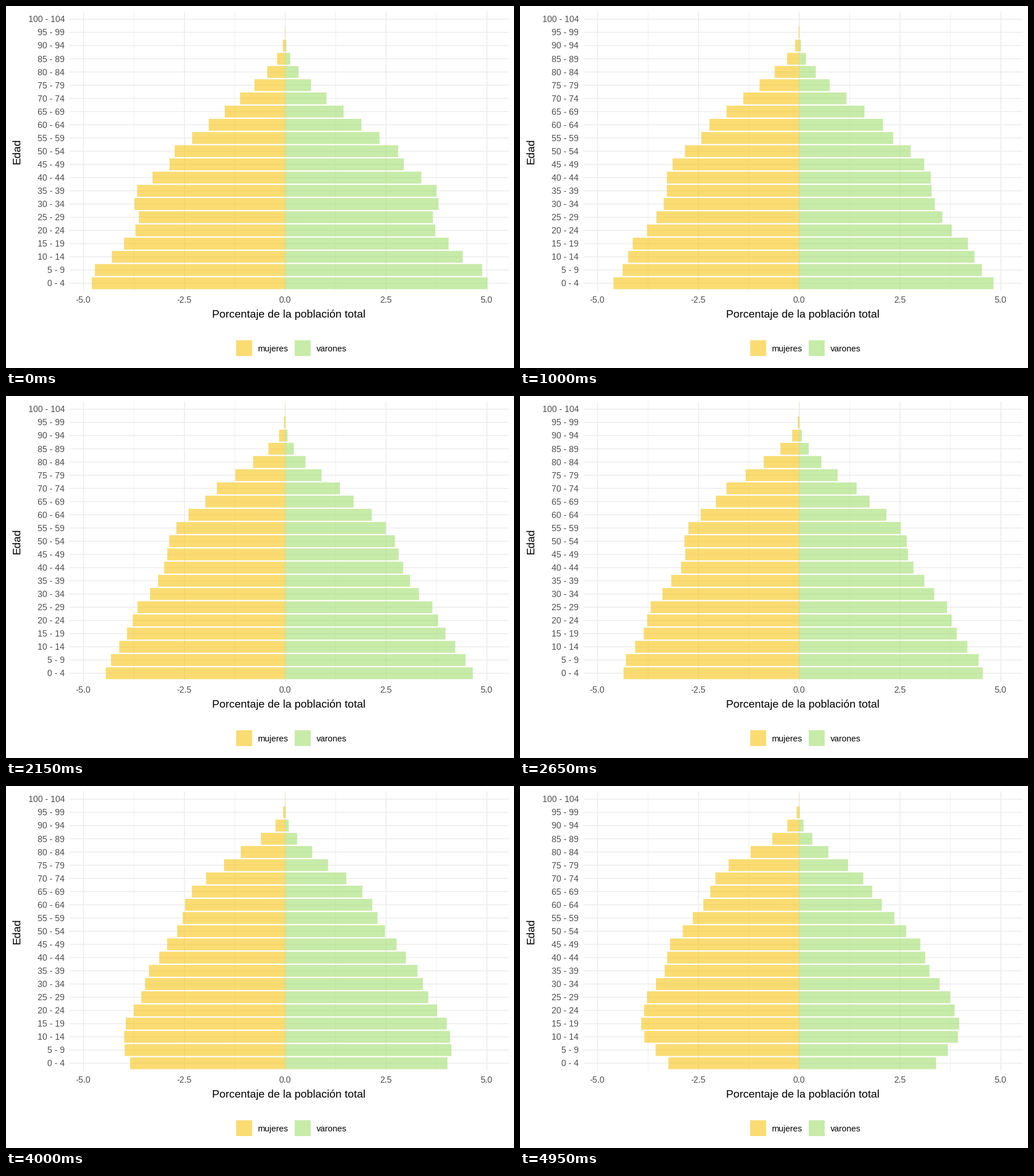
Recreate the animation shown at these times as a matplotlib script. Size 885x632 px, loop 5 s.

```python
import numpy as np
import matplotlib.pyplot as plt
from matplotlib.animation import FuncAnimation
from matplotlib.patches import Rectangle

W, H, DPI = 885, 632, 100
FRAMES, INTERVAL = 100, 50

# Panel geometry in pixels, y pointing down
LEFT, RIGHT, TOP, BOTTOM = 110.4, 875.8, 9.2, 497.8
ZERO, UNIT = 486.5, 70.24
FIRST_ROW, STEP = 484.0, 23.05
BAR = 0.9 * STEP

YELLOW, GREEN = "#F7C514", "#A2DE6E"
ALPHA = 0.6
GRID, GREY = "#EBEBEB", "#4D4D4D"

AGES = np.arange(21)  # five-year age groups
CENSUSES = 5          # ten years, or two age groups, apart

# Relative size at birth of a cohort, by its age group at the first census
COHORTS = [(-8, 221), (-6, 288), (-5, 308), (-3, 327), (-1, 319),
           (1, 340), (2, 325), (4, 309), (5, 317), (6, 343), (7, 354),
           (8, 334), (9, 307), (10, 311), (20, 0)]


def pyramid(census):
    """Women and men per age group, in percent of the whole population."""
    births = np.interp(AGES - 2 * census, *zip(*COHORTS))
    women = births * np.exp(-0.0477 * AGES - np.exp(0.54 * (AGES - 16.83)))
    # Fewer men survive with age; the early censuses hold more older men
    early = 0.019 * np.maximum(AGES - 4, 0) / 2 ** census
    men = women * np.exp(0.045 - 0.01 * AGES
                         - np.exp(0.4 * (AGES - 18.2)) + early)
    people = np.array([women, men])
    return 100 * people / people.sum()


plt.rcParams["font.family"] = "Liberation Sans"
plt.rcParams["text.hinting"] = "native"
fig = plt.figure(figsize=(W / DPI, H / DPI), dpi=DPI, facecolor="white")
ax = fig.add_axes([0, 0, 1, 1])
ax.set_xlim(0, W)
ax.set_ylim(H, 0)
ax.axis("off")


def line(xs, ys, px):
    ax.plot(xs, ys, color=GRID, lw=px * 72 / DPI, solid_capstyle="butt",
            snap=False, zorder=1)


def text(x, y, s, px, color="black", ha="center", **kw):
    ax.text(x, y, s, fontsize=px * 72 / DPI, color=color, ha=ha,
            va="baseline", **kw)


def rect(x, y, w, h, color):
    patch = Rectangle((x, y), w, h, fc=color, alpha=ALPHA, lw=0,
                      snap=False, zorder=2)
    return ax.add_patch(patch)


rows = FIRST_ROW - STEP * AGES

# Grid and axis labels
for v in (-3.75, -1.25, 1.25, 3.75):
    line([ZERO + v * UNIT] * 2, [TOP, BOTTOM], 0.71)
for i, y in enumerate(rows):
    line([LEFT, RIGHT], [y, y], 1.42)
    text(102.3, y + 5.4, f"{5 * i} - {5 * i + 4}", 15.1, GREY, "right")
for v in (-5, -2.5, 0, 2.5, 5):
    x = ZERO + v * UNIT
    line([x, x], [TOP, BOTTOM], 1.42)
    text(x - 0.5, 518.4, f"{v:.1f}", 15.1, GREY)

text(492.2, 543.7, "Porcentaje de la población total", 19.2)
text(24, 253.3, "Edad", 19.2, rotation=90, rotation_mode="anchor")

# Legend
for x, color, name in ((401, YELLOW, "mujeres"), (503, GREEN, "varones")):
    rect(x, 583.5, 27.8, 27.6, color)
    text(x + 38, 603, name, 14.9, ha="left")

women = [rect(ZERO, y - BAR / 2, 0, BAR, YELLOW) for y in rows]
men = [rect(ZERO, y - BAR / 2, 0, BAR, GREEN) for y in rows]
pyramids = [pyramid(k) * UNIT for k in range(CENSUSES)]


def update(frame):
    t = frame / (FRAMES - 1) * (CENSUSES - 1)
    k = min(int(t), CENSUSES - 2)
    left, right = pyramids[k] + (pyramids[k + 1] - pyramids[k]) * (t - k)
    for bar, w in zip(women, left):
        bar.set_x(ZERO - w)
        bar.set_width(w)
    for bar, w in zip(men, right):
        bar.set_width(w)
    return women + men


anim = FuncAnimation(fig, update, frames=FRAMES, interval=INTERVAL,
                     repeat=True, repeat_delay=0, blit=False)
plt.show()
```
